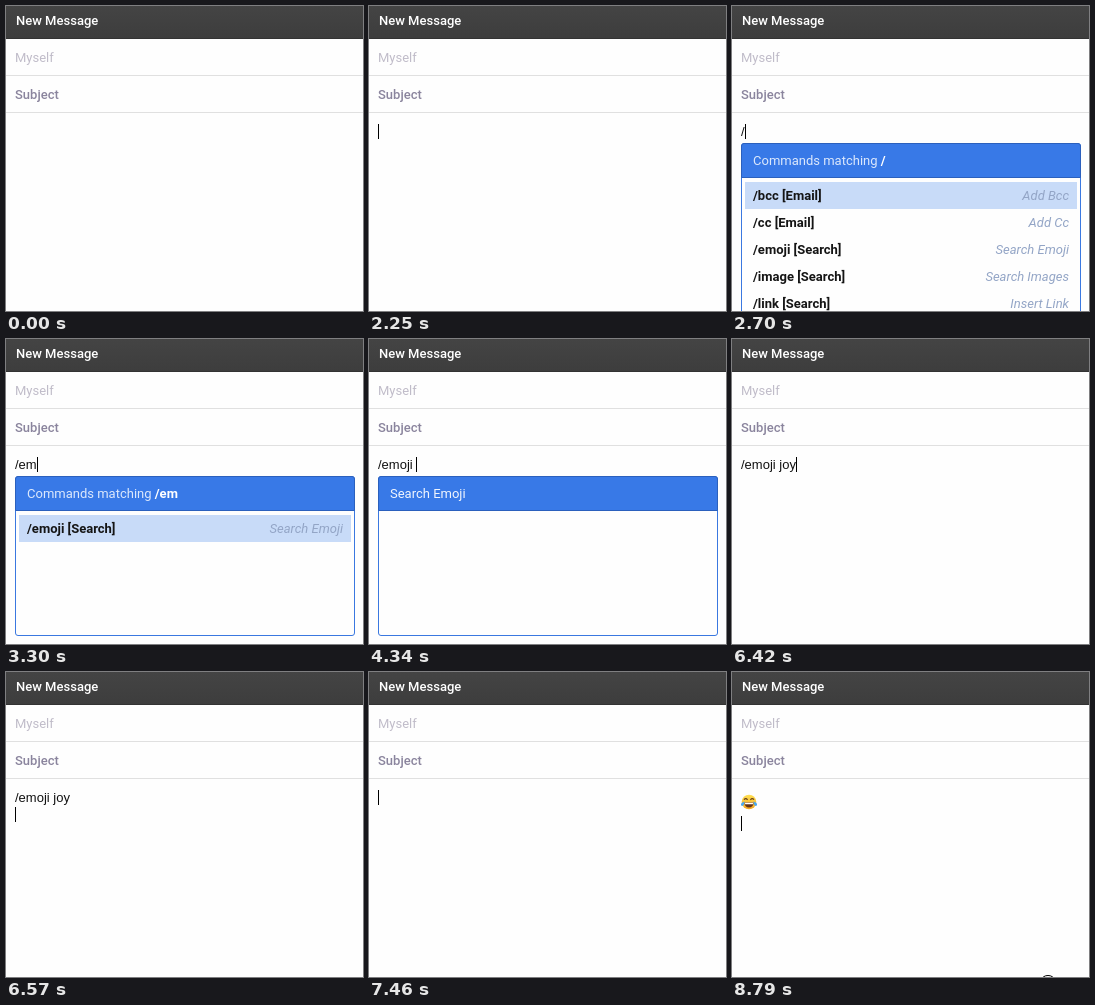
Write an HTML page that moves like this. It is 357 px wide and 305 px high and loops after 8890 ms.

```html
<!DOCTYPE html>
<html lang="en">
<head>
<meta charset="utf-8">
<title>Message composer</title>
<style>
html, body { margin: 0; width: 100%; height: 100%; overflow: hidden; background: #fefefe; }
svg { display: block; width: 100%; height: 100%; }
text { font: 13px Roboto, sans-serif; white-space: pre; }
.medium { font-weight: 500; }
.bold { font-weight: 700; }
.body { font-family: "Liberation Sans", Arial, sans-serif; fill: #111; }
.hint { font-style: italic; fill: #93a5c6; text-anchor: end; }
</style>
</head>
<body>
<svg viewBox="0 0 357 305">
  <defs>
    <linearGradient id="bar" x2="0" y2="1">
      <stop stop-color="#444"/><stop offset="1" stop-color="#3d3d3d"/>
    </linearGradient>
    <linearGradient id="skin" x2="0" y2="1">
      <stop stop-color="#ffe052"/><stop offset="1" stop-color="#f5a623"/>
    </linearGradient>
    <g id="face">
      <circle r="7.3" fill="url(#skin)"/>
      <path d="M-5 -2.2Q-3.3 -4.6 -1.4 -2.2M1.4 -2.2Q3.3 -4.6 5 -2.2" fill="none" stroke="#66401a" stroke-width="1.1"/>
      <path d="M-4.6 .6H4.6Q4.2 5.6 0 5.6T-4.6 .6Z" fill="#66351a"/>
      <path d="M-4.2 .8H4.2L3.8 2.3H-3.8Z" fill="#fff"/>
      <path id="tear" d="M-4.4 -.6Q-8.6 .6 -8 3.2Q-6.4 5 -5 2.6Z" fill="#4aa8ee"/>
      <use href="#tear" transform="scale(-1 1)"/>
    </g>
    <g id="cat">
      <path d="M-7 -1L-6.5 -8L-1 -5.5ZM7 -1L6.5 -8L1 -5.5Z" fill="#f3b32f"/>
      <use href="#face"/>
    </g>
  </defs>

  <rect width="357" height="305" fill="#fefefe"/>
  <rect width="357" height="33" fill="url(#bar)"/>
  <rect y="32" width="357" height="1" fill="#333"/>
  <text class="medium" x="10" y="19" fill="#fff">New Message</text>
  <text x="9" y="56" fill="#c0bcc9">Myself</text>
  <text class="medium" x="9" y="93" fill="#8a849d">Subject</text>
  <path d="M0 69.5H357M0 106.5H357" stroke="#e0e0e0"/>

  <text id="typed" class="body" x="9" y="130"></text>
  <use id="emoji" href="#face" x="17" y="130"/>
  <rect id="caret" width="1" height="15" fill="#000"/>

  <g id="popup">
    <rect id="frame" x="9.5" y="137.5" width="339" rx="2.5" fill="#fefefe" stroke="#3a78e0"/>
    <path d="M9.5 171.5V140Q9.5 137.5 12 137.5H346Q348.5 137.5 348.5 140V171.5Z" fill="#3879e7" stroke="#2b60bd"/>
    <text id="head" x="21" y="159" fill="#dce8fc"></text>
    <g id="rows"></g>
  </g>
  <ellipse id="pointer" cx="316" cy="307.5" rx="6" ry="4" fill="#fff" stroke="#000"/>
</svg>
<script>
const LOOP = 8890;
const $ = id => document.getElementById(id);

const commands = [
  ["/bcc [Email]", "Add Bcc"],
  ["/cc [Email]", "Add Cc"],
  ["/emoji [Search]", "Search Emoji"],
  ["/image [Search]", "Search Images"],
  ["/link [Search]", "Insert Link"]
];
const results = ["joy", "joy_cat", "overjoyed", "enjoy"];

// [start, typed text, popup mode, command query]
const steps = [
  [0, ""],
  [2700, "/", "commands", "/"],
  [3150, "/e", "commands", "/e"],
  [3300, "/em", "commands", "/em"],
  [3450, "/emo", "commands", "/em"],
  [3600, "/emo", "commands", "/emo"],
  [4340, "/emoji ", "empty"],
  [5390, "/emoji j", "prompt"],
  [5530, "/emoji jo", "prompt"],
  [5830, "/emoji joy", "results"],
  [6420, "/emoji joy"],
  [6720, "/emoji j"],
  [6860, "/emoji "],
  [7010, "/emoj"],
  [7160, "/em"],
  [7310, "/"],
  [7460, ""]
];
const hiddenCaret = [[0, 1200], [1650, 2250], [4040, 4340], [4790, 5390], [8050, 8490]];

const within = (t, a, b) => t >= a && t < b;
const show = (id, on) => $(id).setAttribute("display", on ? "inline" : "none");

function row(i, label, extra = "", style = "", x = 21) {
  const y = 176 + 27 * i;
  const back = i ? "" : `<rect x="13" y="${y}" width="332" height="27" fill="#c8dbf8"/>`;
  return `${back}<text class="bold" x="${x}" y="${y + 18}" fill="#151515" style="${style}">${label}</text>${extra}`;
}

function commandRows(query) {
  return commands.filter(c => c[0].startsWith(query)).map(([name, hint], i) =>
    row(i, name, `<text class="hint" x="337" y="${194 + 27 * i}">${hint}</text>`)).join("");
}

function resultRows() {
  return results.map((name, i) => {
    const icon = `<use href="#${i === 1 ? "cat" : "face"}" x="29" y="${189 + 27 * i}"/>`;
    return row(i, name, icon, "", 42);
  }).join("");
}

function drawPopup(mode, query) {
  show("popup", !!mode);
  if (!mode) return;
  $("frame").setAttribute("height", query === "/" ? 180 : 159);
  $("head").innerHTML = mode === "commands"
    ? `Commands matching <tspan class="bold" fill="#fff">${query}</tspan>`
    : `<tspan fill="#f0f5fe">Search Emoji</tspan>`;
  $("rows").innerHTML =
    mode === "commands" ? commandRows(query) :
    mode === "prompt" ? row(0, "(enter a search term)", "", "font-style:italic") :
    mode === "results" ? resultRows() : "";
}

let last;
function render(t) {
  const step = steps.filter(s => s[0] <= t).pop();
  const [, text, mode, query] = step;
  if (step !== last) {
    $("typed").textContent = text;
    drawPopup(mode, query);
    last = step;
  }
  const done = t >= 7600;
  const newLine = within(t, 6570, 6720);
  const width = text && !newLine ? $("typed").getComputedTextLength() : 0;
  $("caret").setAttribute("x", Math.round(9 + width));
  $("caret").setAttribute("y", done ? 144 : newLine ? 135 : 118);
  show("caret", !hiddenCaret.some(([a, b]) => within(t, a, b)));
  show("emoji", done);
  show("pointer", t >= 8790);
}

const start = performance.now();
function tick() {
  render((performance.now() - start) % LOOP);
  requestAnimationFrame(tick);
}
tick();
</script>
</body>
</html>
```
